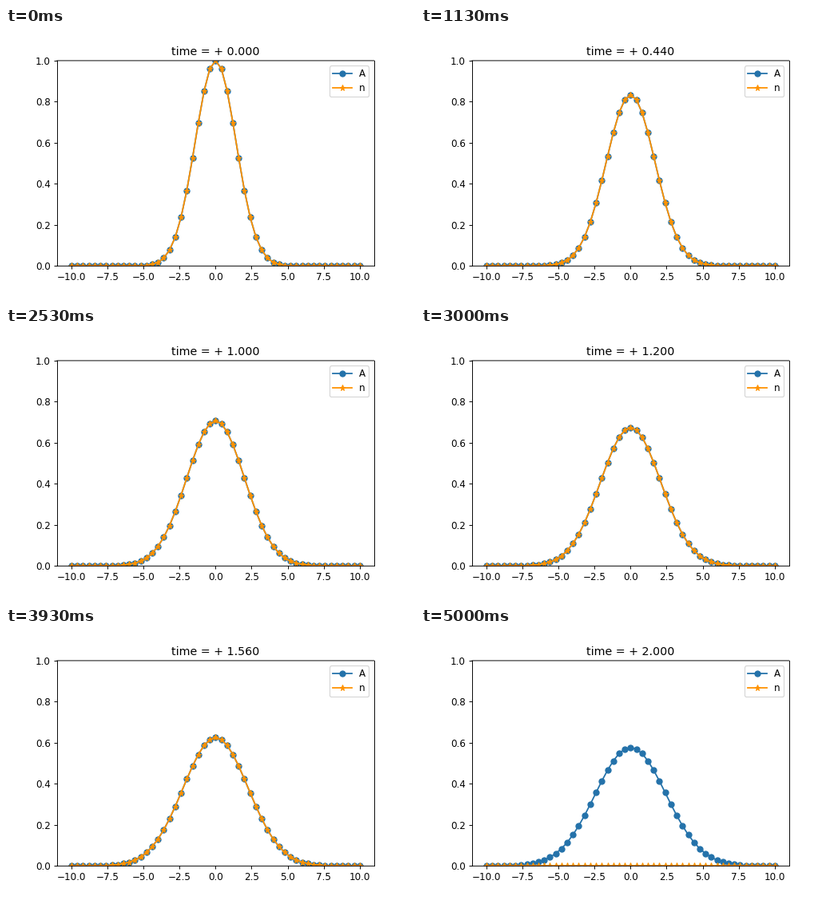
Recreate the animation shown at these times as a matplotlib script. Size 512x341 px, loop 5.07 s.

```python
import numpy as np
import matplotlib.pyplot as plt
from matplotlib.animation import FuncAnimation

WIDTH, HEIGHT = 512, 341
DPI = WIDTH / 6
LOOP_MS, TICK_MS = 5070, 30
LAST_STEP, DT = 50, 0.04
BLUE, ORANGE = "#2472aa", "#ff9200"

plt.rcParams["font.family"] = "DejaVu Sans"

x = np.linspace(-10, 10, 51)


def gaussian(t):
    """Diffusing pulse: spreads and sinks as time passes."""
    return np.exp(-x**2 / (4 * (1 + t))) / np.sqrt(1 + t)


def step_at(ms):
    """Steps last 100 ms on average; odd ones start 30 ms late."""
    step, rest = divmod(ms, 100)
    if step % 2 and rest < 30:
        step -= 1
    return min(step, LAST_STEP)


fig, ax = plt.subplots(figsize=(WIDTH / DPI, HEIGHT / DPI), dpi=DPI)
fig.subplots_adjust(left=0.125, right=0.9, bottom=0.125, top=0.88)

analytic, = ax.plot(x, gaussian(0), "o-", color=BLUE, label="A")
numeric, = ax.plot(x, gaussian(0), "*-", color=ORANGE, label="n")
ax.set_xlim(-11, 11)
ax.set_ylim(0, 1)
ax.set_xticks(np.arange(-10, 10.1, 2.5))
ax.set_yticks(np.linspace(0, 1, 6))
ax.tick_params(axis="x", pad=2.7)
# keep the horizontal edges at their exact height between pixel rows
ax.spines[["top", "bottom"]].set_snap(False)
ax.legend(loc="upper right", borderpad=0.34, labelspacing=0.42,
          borderaxespad=0.55)
title = ax.set_title("time = + 0.000", pad=5.6)


def update(i):
    step = step_at((i + 1) * TICK_MS - 1)
    t = step * DT
    y = gaussian(t)
    analytic.set_ydata(y)
    # the numeric curve is empty at the final step
    numeric.set_ydata(y if step < LAST_STEP else np.zeros_like(x))
    title.set_text(f"time = + {t:.3f}")
    return analytic, numeric, title


anim = FuncAnimation(fig, update, frames=LOOP_MS // TICK_MS,
                     interval=TICK_MS, repeat=True, repeat_delay=0)
plt.show()
```
